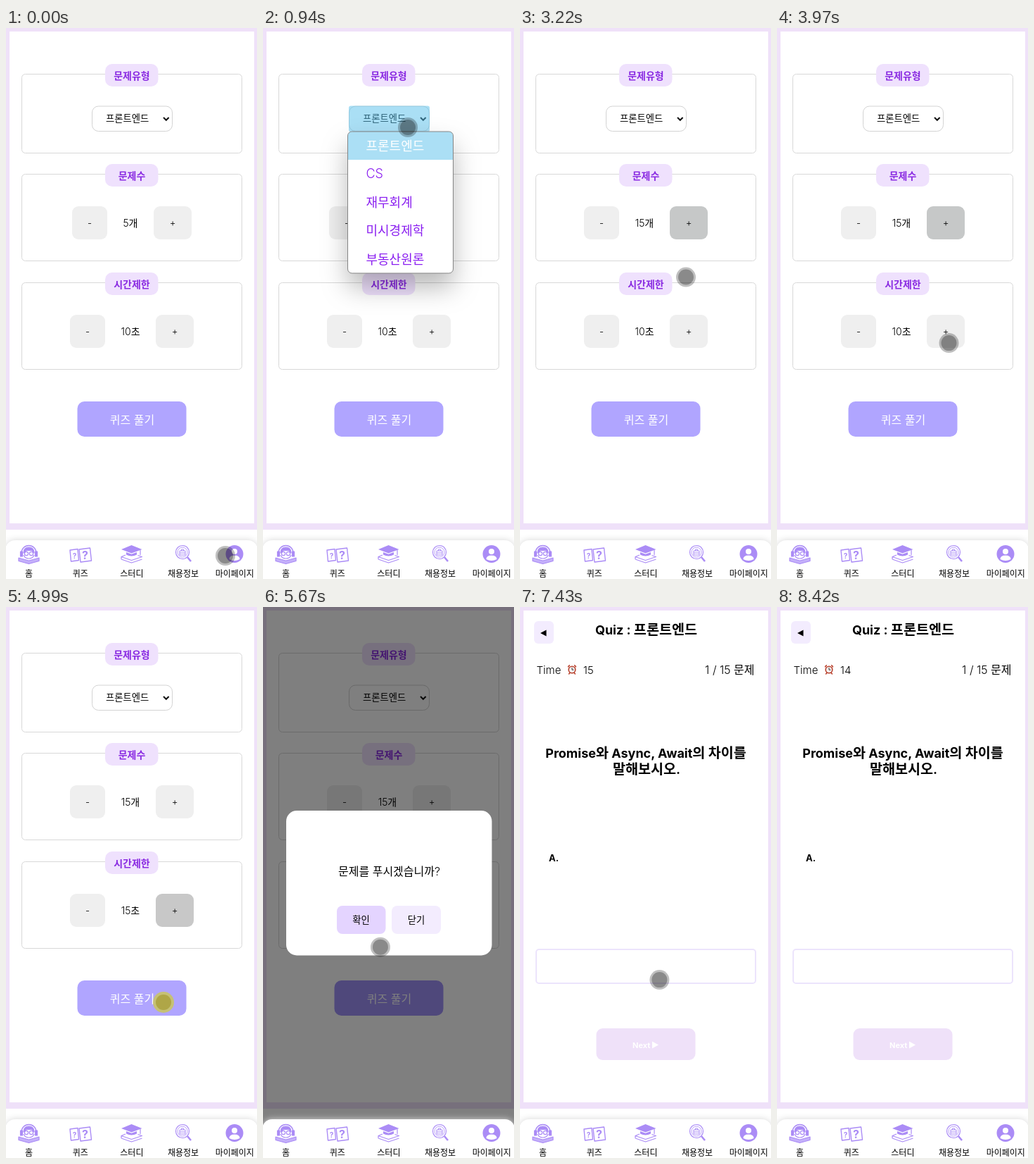
Animation, 357 px wide and 782 px high, one loop 8840 ms. Source, as an HTML page:

```html
<!DOCTYPE html>
<html lang="ko">
<head>
<meta charset="utf-8">
<title>Quiz</title>
<style>
  html, body { margin: 0; width: 100%; height: 100%; overflow: hidden; background: #fff; }
  svg { display: block; font-family: Inter, "Noto Sans CJK KR", "Noto Sans CJK", sans-serif; font-weight: 300; }
  .ko { font-size: 1.09em; }
  #nav > rect { filter: drop-shadow(0 0 5px #d6d6d6); }
  #menu > .panel { filter: drop-shadow(0 20px 18px rgba(0, 0, 0, .28)); }
</style>
</head>
<body>
<svg id="stage" width="357" height="782" viewBox="0 0 357 782"></svg>
<script>
const LOOP = 8840;
const PURPLE = '#8a2be2', LILAC = '#efe1f9', ICON = '#ab8cf6';

const box = (x, y, w, h, r, fill, attrs = '') =>
  `<rect x="${x}" y="${y}" width="${w}" height="${h}" rx="${r}" fill="${fill}" ${attrs}/>`;
const text = (x, y, size, str, attrs = '') =>
  `<text x="${x}" y="${y}" font-size="${size}" text-anchor="middle" ${attrs}>${str}</text>`;
const ko = str => `<tspan class="ko">${str}</tspan>`;
const left = 'style="text-anchor:start"';

const section = (y, h, title) =>
  box(22.5, y + .5, 313, h, 5, 'none', 'stroke="#d8d8d8"') +
  box(141, y - 14, 75.5, 32, 10, '#efe1fd') +
  text(179, y + 7.5, 14, title, `font-weight="600" fill="${PURPLE}"`);

const stepper = (id, y, unit) => `
  <g id="${id}Minus">${box(91, y, 50, 47, 9, '#efefef') + text(116, y + 29, 13.33, '-')}</g>
  <g id="${id}Plus">${box(213, y, 54, 47, 9, '#efefef') + text(240, y + 28, 13.33, '+')}</g>
  <text x="177" y="${y + 29}" font-size="14" text-anchor="middle"><tspan id="${id}Value"></tspan>${unit}</text>`;

const setup = `<g id="setup">
  ${section(65, 112, '문제유형') + section(207, 123, '문제수') + section(361, 123, '시간제한')}
  ${box(122.5, 111, 114, 35.5, 9, '#fff', 'id="select" stroke="#d3d3d3"')}
  ${box(123, 111.5, 113, 34.5, 9, 'none', 'id="focus" stroke="#e59700" stroke-width="2"')}
  ${text(142, 133, 13.33, '프론트엔드', left)}
  <path d="M224 127l3.8 3.8 3.8-3.8" fill="none" stroke="#111" stroke-width="2"/>
  ${box(122, 110.5, 115, 37, 3, '#57bfeb', 'id="tap" opacity=".5"')}
  ${stepper('count', 253, '개') + stepper('limit', 407, '초')}
  ${box(101.5, 530, 155, 50, 10, '#b0a5ff', 'id="start"')}
  ${text(179.5, 561.5, 16, '퀴즈 풀기', 'fill="#fff"')}
</g>`;

const options = ['CS', '재무회계', '미시경제학', '부동산원론'];
const menu = `<g id="menu">
  ${box(120.5, 147, 150, 201, 6, '#fff', 'class="panel"')}
  <path d="M121 187V153q0-6 6-6H264q6 0 6 6V187z" fill="#abdff5"/>
  ${text(146.5, 173.5, 18, '프론트엔드', left + ' fill="#fff"')}
  ${options.map((o, i) => text(146.5, 213 + i * 40.5, 18, o, left + ' fill="#8a1ef0"')).join('')}
  ${box(120.5, 147, 150, 201, 6, 'none', 'stroke="#858585"')}
</g>`;

const modal = `<g id="modal">
  ${box(0, 0, 357, 782, 0, '#000', 'opacity=".5"')}
  ${box(33, 289, 292.5, 205.5, 15, '#fff')}
  ${text(179.5, 381, 16, '문제를 푸시겠습니까?')}
  ${box(105, 424, 69.5, 40, 8, '#e4d4ff', 'id="confirm"') + text(139.5, 448.5, 13.33, '확인')}
  ${box(183, 424, 70, 40, 8, '#f3ecfe') + text(218, 448.5, 13.33, '닫기')}
</g>`;

const clock = `<g fill="none" stroke="#b8402c" stroke-width="1.6" stroke-linecap="round">
  <circle cx="74" cy="89" r="4.8" fill="#f4f4f4"/>
  <path d="M68.6 84.6l1.800-1.800M79.4 84.6l-1.800-1.800M70.8 93.600l-1.200 1.400M77.2 93.600l1.200 1.400"/>
  <path d="M74 86.500v2.700h2" stroke="#333" stroke-width="1"/></g>`;

const quiz = `<g id="quiz">
  ${box(20, 20, 28, 32, 6, '#f3ecfe')}<path d="M37.5 32.500v9l-8.500-4.500z"/>
  ${text(179.5, 39, 18, 'Quiz : ' + ko('프론트엔드'), 'font-weight="700"')}
  ${text(23.5, 94.5, 15, 'Time', left)}${clock}
  <text id="timer" x="90" y="94.5" font-size="15"></text>
  ${text(333.500, 94.5, 16, '1 / 15 문제', 'style="text-anchor:end"')}
  <g font-weight="700">
    ${text(179, 214, 18, `Promise${ko('와')} Async, Await${ko('의')} ${ko('차이를')}`)}
    ${text(180, 237, 18, ko('말해보시오') + '.')}
    ${text(41, 361, 13, 'A.', left)}
    ${box(23, 486, 312, 48, 4, '#fff', 'stroke="#ece4fc" stroke-width="2"')}
    ${box(108.5, 598, 141, 45, 9, LILAC)}
    ${text(160, 625.5, 11, 'Next', left + ' fill="#fff"')}
  </g>
  <path d="M188 616.5v10l9-5z" fill="#fff"/>
</g>`;

const icons = `<g fill="none" stroke="${ICON}" stroke-width="1.2" stroke-linejoin="round">
  <path d="M22 745a10.500 10.500 0 0 1 21 0" stroke-width="1.500"/>
  <path d="M25 745q0-8 7.500-8t7.500 8l-3-3.500h-8z" fill="${ICON}"/>
  <path d="M20.500 743h3v7h-3zM41.500 743h3v7h-3z" fill="${ICON}"/>
  <circle cx="29" cy="746" r="2.600"/><circle cx="36" cy="746" r="2.600"/>
  <path d="M25 748q2 5 7.500 5t7.500-5"/>
  <path d="M18 752l14.500 4 14.500-4v4.500l-14.500 4-14.500-4z" fill="#c4b0fa"/>

  <path d="M91 741l11-1.500 1.500 16-11 1.500zM104 740l15.500-2 2 18-15.500 2z" stroke-width="1.400"/>
  <g fill="${ICON}" stroke="none" font-weight="700">
    ${text(97.5, 752.500, 10, '?') + text(112.500, 754, 16, '?')}
  </g>

  <path d="M164 740l14.500-6 15 6-15 5.500zM171 744v3.500q7.500 4 15 0V744l-7.500 2.800z" fill="${ICON}" stroke="none"/>
  <path d="M191 741v7M170 748l-6 2.500 14.500 5 15-5-6-2M164 754l14.500 5 15-5M164 750.500v3.500"/>

  <circle cx="251" cy="744" r="9.500"/><circle cx="251" cy="744" r="7" stroke-width=".8"/>
  <path d="M258 751l5 6" stroke-width="2.600"/>
  <path d="M247 742h8v6h-8zM249.500 742v-2h3v2M247 745h8" stroke-width="1"/>

  <g stroke="none"><circle cx="325" cy="746.500" r="12.500" fill="${ICON}"/>
  <circle cx="325" cy="743" r="4" fill="#fff"/>
  <path d="M317.500 754q0-5.500 7.500-5.500t7.500 5.500q-7.500 4-15 0z" fill="#fff"/></g>
</g>`;

const labels = ['홈', '퀴즈', '스터디', '채용정보', '마이페이지'];
const nav = `<g id="nav">
  ${box(-1, 727, 359, 80, 14, '#fff')}${icons}
  ${labels.map((l, i) => text(32.5 + i * 73.2, 778.5, 12, l)).join('')}
</g>`;

const frame = `<path d="M0 0H357V712H0zM5 5V703H353V5z" fill="${LILAC}" fill-rule="evenodd"/>`;
const cursor = '<g id="cursor"><circle id="ring"/><circle id="dot"/></g>';

const $ = id => document.getElementById(id);
$('stage').innerHTML = box(0, 0, 357, 782, 0, '#fff') + frame + setup + menu + quiz + modal + nav + cursor;

// Pointer path: time, x, y
const path = [
  [0, 312, 749], [40, 312, 749], [790, 206, 141], [1300, 206, 141], [1490, 211, 133],
  [1700, 211, 133], [2020, 217, 279], [2250, 231, 284], [3030, 231, 284], [3220, 236, 353],
  [3360, 234, 492], [3500, 234, 492], [4040, 245, 445], [4310, 245, 445], [4590, 224, 561],
  [5390, 224, 561], [5870, 133, 436], [6720, 133, 436], [6990, 153, 471], [7630, 225, 565],
  [8110, 326, 752], [LOOP, 326, 752]
];
const presses = [[800, 870], [1420, 1750], [2350, 2480], [2950, 3090], [4040, 4180], [4590, 5060], [6260, 6460]];

const slope = (i, k) => path[i] && path[i + 1] ? (path[i + 1][k] - path[i][k]) / (path[i + 1][0] - path[i][0]) : 0;
function tangent(i, k) {
  const a = slope(i - 1, k), b = slope(i, k);
  return a * b > 0 ? 2 * a * b / (a + b) : 0;
}
// Monotone cubic interpolation, so the pointer never overshoots a stop
function along(t, k) {
  const i = path.findIndex((p, n) => n === path.length - 2 || t < path[n + 1][0]);
  const p = path[i], q = path[i + 1], d = q[0] - p[0], u = (t - p[0]) / d, s = u * u * (3 - 2 * u);
  return p[k] + (q[k] - p[k]) * s +
    d * u * (1 - u) * (tangent(i, k) * (1 - u) - tangent(i + 1, k) * u);
}

const show = (id, on) => $(id).setAttribute('display', on ? 'inline' : 'none');
const set = (id, attrs) => Object.entries(attrs).forEach(([k, v]) => $(id).setAttribute(k, v));
const within = (t, a, b) => t >= a && t < b;

function draw(t) {
  const inQuiz = t >= 7380;
  show('setup', !inQuiz);
  show('quiz', inQuiz);
  show('menu', within(t, 870, 1820));
  show('modal', within(t, 5060, 7300));
  show('cursor', t < 8160);
  show('tap', within(t, 870, 1050));
  show('focus', within(t, 1050, 2450));

  const single = t < 2450;
  $('countValue').textContent = single ? 5 : t < 3090 ? 10 : 15;
  set('countMinus', { transform: `translate(${single ? 3 : 0})` });
  set('countPlus', { transform: `translate(${single ? -3 : 0})` });
  $('limitValue').textContent = t < 4180 ? 10 : 15;
  $('countPlus').firstChild.setAttribute('fill', within(t, 2450, 4180) ? '#c6c8c8' : '#efefef');
  $('limitPlus').firstChild.setAttribute('fill', within(t, 4180, 5060) ? '#c8c8c8' : '#efefef');
  set('start', { fill: within(t, 5060, 6460) ? '#9f92f8' : '#b0a5ff' });
  set('confirm', { fill: t < 6460 ? '#e4d4ff' : '#d4bfff' });
  $('timer').textContent = t < 8420 ? 15 : 14;

  const pressed = presses.some(([a, b]) => within(t, a, b));
  set('cursor', { transform: `translate(${along(t, 1)} ${along(t, 2)})` });
  set('ring', { r: pressed ? 15 : 14, fill: pressed ? 'rgba(204,200,84,.8)' : 'rgba(0,0,0,.25)' });
  set('dot', { r: 11, fill: pressed ? 'rgba(172,163,66,.9)' : 'rgba(0,0,0,.28)' });
}

function tick() {
  draw(performance.now() % LOOP);
  requestAnimationFrame(tick);
}
tick();
</script>
</body>
</html>
```
